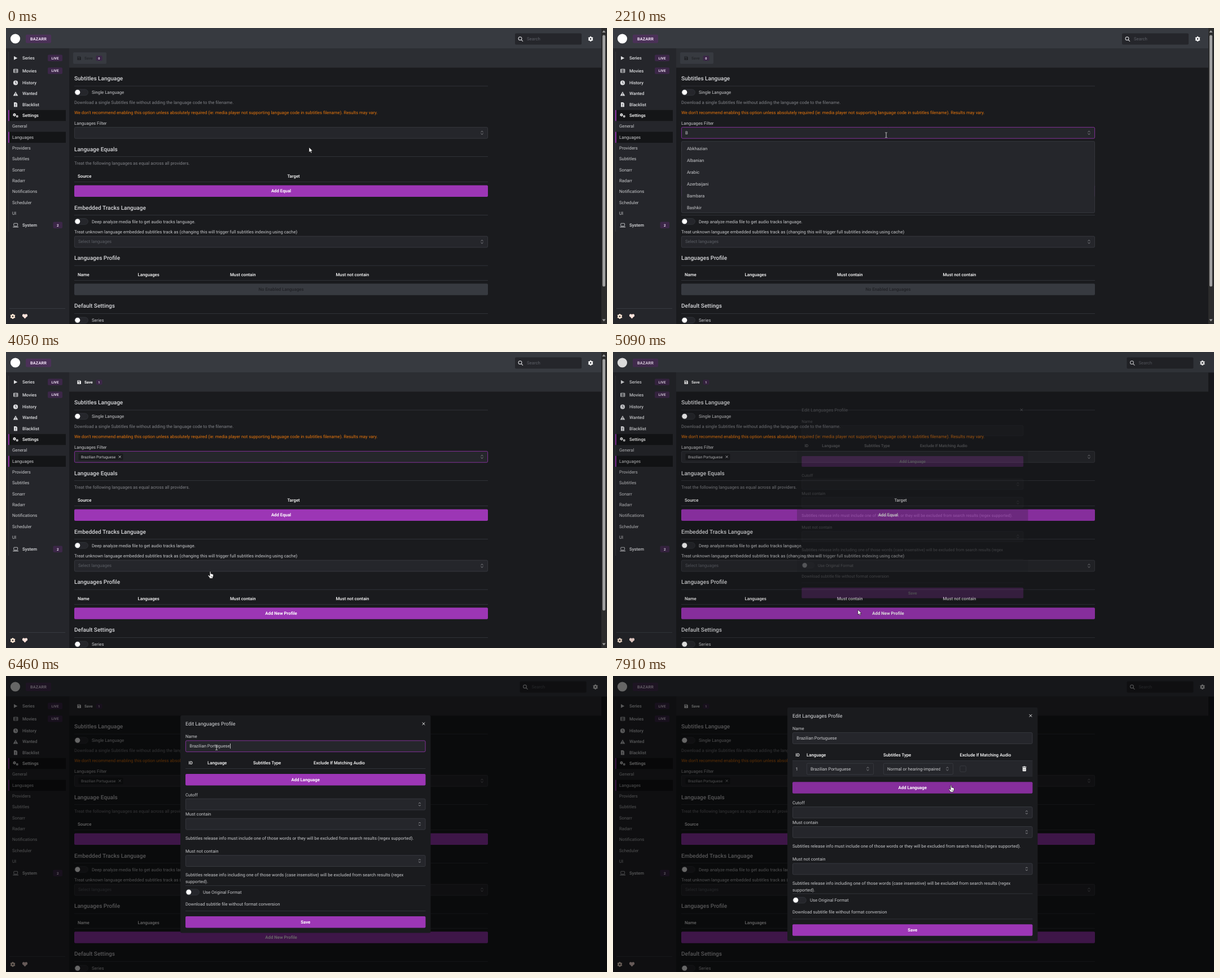
These frames come from a looping animation (1065x526 px, 7.99 s). An HTML page with a canvas:

```html
<!DOCTYPE html>
<html lang="en">
<head>
<meta charset="utf-8">
<title>Languages settings</title>
<style>
html, body { margin: 0; width: 100%; height: 100%; overflow: hidden; background: #1a1b1e; }
canvas { display: block; }
</style>
</head>
<body>
<canvas id="stage" width="1065" height="526"></canvas>
<script>
const W = 1065, H = 526, LOOP = 7990, K = 0.5567;
const stage = document.getElementById('stage').getContext('2d');
const layer = document.createElement('canvas');
layer.width = W;
layer.height = H;
const modalCtx = layer.getContext('2d');
let c = stage;

const C = {
  body: '#1a1b1e', side: '#25262b', bar: '#2c2e33', head: '#373a40', dark: '#141517',
  line: '#373a40', text: '#c9cacd', dim: '#808287', faint: '#5c5f66', white: '#fff',
  accent: '#9c36b5', hover: '#862e9c', badge: '#3c2748', warn: '#e8760c'
};

// Bursts of change: start, end, number of steps
const BURSTS = [[920, 1610, 11], [2080, 2210, 2], [2540, 2610, 2], [2810, 3570, 11],
  [3630, 3630, 1], [3770, 4540, 12], [4610, 4610, 1], [4760, 5510, 12], [5580, 6200, 10],
  [6460, 6460, 1], [6860, 7630, 12], [7700, 7910, 4]];

// Pointer path: time, x, y, easing towards this point
const PATH = [[0, 537, 212, 'lin'], [920, 537, 212, 'lin'], [1370, 484, 190, 'both'],
  [2810, 484, 190, 'lin'], [3190, 271, 205, 'both'], [3420, 265, 210, 'out'],
  [3770, 265, 210, 'lin'], [4050, 362, 390, 'in'], [4540, 434, 457, 'out'],
  [4610, 434, 458, 'lin'], [5100, 434, 458, 'lin'], [5510, 387, 187, 'both'],
  [5720, 373, 127, 'out'], [6860, 373, 127, 'lin'], [7350, 600, 184, 'both'],
  [7700, 600, 185, 'lin'], [7910, 599, 194, 'out']];
const PRESSES = [[1400, 1600], [3490, 3620], [4760, 4900], [5780, 5930], [7480, 7690]];
const EASE = {
  lin: p => p,
  in: p => p ** 1.6,
  out: p => 1 - (1 - p) ** 2,
  both: p => p * p * (3 - 2 * p)
};

function snap(t) {
  let at = 0;
  for (const [a, b, n] of BURSTS) {
    if (t < a) break;
    if (n === 1) { at = a; continue; }
    const step = (b - a) / (n - 1);
    at = a + Math.min(n - 1, Math.floor((t - a + 25) / step)) * step;
  }
  return at;
}

function pointer(t) {
  const i = PATH.findIndex(k => k[0] > t);
  if (i < 0) return PATH[PATH.length - 1].slice(1, 3);
  const a = PATH[i - 1], b = PATH[i];
  const p = EASE[b[3]]((t - a[0]) / (b[0] - a[0]));
  return [a[1] + (b[1] - a[1]) * p, a[2] + (b[2] - a[2]) * p];
}

const within = (t, [a, b]) => t >= a && t < b;

function rect(x, y, w, h, fill, r = 0, stroke) {
  c.beginPath();
  c.roundRect(x, y, w, h, r);
  if (fill) { c.fillStyle = fill; c.fill(); }
  if (stroke) { c.strokeStyle = stroke; c.lineWidth = 0.8; c.stroke(); }
}

function dot(x, y, r, fill) {
  c.beginPath();
  c.arc(x, y, r, 0, 7);
  c.fillStyle = fill;
  c.fill();
}

function poly(pts, fill, stroke, width = 0.8, close = true) {
  c.beginPath();
  pts.forEach(([x, y]) => c.lineTo(x, y));
  if (close) c.closePath();
  if (fill) { c.fillStyle = fill; c.fill(); }
  if (stroke) { c.strokeStyle = stroke; c.lineWidth = width; c.lineJoin = 'round'; c.stroke(); }
}

// y is the middle of the capitals, size is in unscaled px
function text(s, x, y, fill = C.text, size = 14, weight = 400, align = 'left') {
  c.font = `${weight} ${size * K}px Roboto, sans-serif`;
  c.textRendering = 'geometricPrecision';
  c.textAlign = align;
  c.fillStyle = fill;
  c.fillText(s, x, y + size * K * 0.36);
}

const rule = (x, y, w) => rect(x, y - 0.4, w, 0.8, C.line);
const label = (s, x, y, fill = C.white) => text(s, x, y, fill, 14, 500);

function badge(s, x, y, w, h, size = 11, fill = C.badge) {
  rect(x, y - h / 2, w, h, fill, 2);
  c.letterSpacing = '0.14px';
  text(s, x + w / 2, y, '#f3e4f8', size, 700, 'center');
  c.letterSpacing = '0px';
}

function chevrons(x, y) {
  poly([[x - 2, y - 1.2], [x, y - 3], [x + 2, y - 1.2]], null, '#a6a7ab', 0.8, false);
  poly([[x - 2, y + 1.2], [x, y + 3], [x + 2, y + 1.2]], null, '#a6a7ab', 0.8, false);
}

function cross(x, y, r, color) {
  poly([[x - r, y - r], [x + r, y + r]], null, color, 0.9, false);
  poly([[x - r, y + r], [x + r, y - r]], null, color, 0.9, false);
}

function field(x, y, w, select = true, focus = false) {
  rect(x + 0.4, y + 0.4, w - 0.8, 19.8, C.side, 2, focus ? C.accent : '#3b3e44');
  if (select) chevrons(x + w - 10.5, y + 10.2);
}

function button(s, x, y, w, hot) {
  rect(x, y, w, 20.5, hot ? C.hover : C.accent, 2);
  text(s, x + w / 2, y + 10.2, C.white, 14, 600, 'center');
}

function toggle(s, x, y) {
  rect(x + 0.4, y - 5.2, 24, 10.6, C.side, 5.3, '#33363b');
  dot(x + 5.8, y, 4.5, C.white);
  text(s, x + 31, y);
}

function gear(x, y, r, color) {
  c.strokeStyle = color;
  c.lineWidth = r * 0.55;
  c.beginPath();
  c.arc(x, y, r * 0.6, 0, 7);
  c.stroke();
  c.lineWidth = r * 0.4;
  for (let i = 0; i < 6; i++) {
    const a = i * Math.PI / 3 + 0.52;
    c.beginPath();
    c.moveTo(x + Math.cos(a) * r * 0.7, y + Math.sin(a) * r * 0.7);
    c.lineTo(x + Math.cos(a) * r * 1.1, y + Math.sin(a) * r * 1.1);
    c.stroke();
  }
}

function heart(x, y, color) {
  dot(x - 2.1, y - 1.2, 2.5, color);
  dot(x + 2.1, y - 1.2, 2.5, color);
  poly([[x - 4.4, y - 0.2], [x + 4.4, y - 0.2], [x, y + 4.5]], color);
}

function floppy(x, y, fill, hole) {
  poly([[x - 3, y - 3.2], [x + 1.8, y - 3.2], [x + 3.3, y - 1.6], [x + 3.3, y + 3.3], [x - 3, y + 3.3]], fill);
  rect(x - 1.8, y - 2.2, 3.2, 1.5, hole);
  dot(x + 0.1, y + 1.4, 1, hole);
}

function header(locked) {
  rect(0, 0, W, 36.5, C.head);
  dot(16.5, 19, 8.6, C.white);
  badge('BAZARR', 35, 19.3, 45, 15, 13, '#4b3158');
  const s = locked ? 8.5 : 0;
  rect(902 + s, 9.5, 118, 20, C.side, 2);
  c.strokeStyle = C.text;
  c.lineWidth = 1.2;
  c.beginPath();
  c.arc(911 + s, 18.8, 2.9, 0, 7);
  c.moveTo(913.2 + s, 21);
  c.lineTo(916 + s, 23.8);
  c.stroke();
  text('Search', 923 + s, 19.5, C.faint);
  gear(1036 + s, 19.4, 4.2, C.white);
}

function sidebar() {
  rect(0, 36.5, 112, H, C.side);
  rect(4.3, 42, 0.8, 320, '#3b3e44');
  for (const y of [145.8, 184.6]) {
    rect(4, y, 102, 19.4, C.dark);
    rect(4, y, 1.8, 19.4, C.accent);
  }
  const items = [['Series', 53.3], ['Movies', 76], ['History', 97.2], ['Wanted', 116.6],
    ['Blacklist', 135.8], ['Settings', 155.2], ['System', 350.3]];
  items.forEach(([s, y]) => label(s, 29, y, s === 'Settings' ? C.white : '#dcdde0'));
  'General,Languages,Providers,Subtitles,Sonarr,Radarr,Notifications,Scheduler,UI'.split(',')
    .forEach((s, i) => text(s, 11, 174.4 + i * 19.36));
  badge('LIVE', 74, 53.3, 26, 11.5);
  badge('LIVE', 74, 76, 26, 11.5);
  badge('2', 83.5, 350.3, 16.5, 11.5);

  const w = '#dcdde0';
  poly([[14, 50], [20.3, 53.4], [14, 56.8]], w);
  rect(13, 72.8, 8.4, 6.8, w, 1);
  rect(15.2, 73.8, 4, 1.9, C.side);
  rect(15.2, 76.7, 4, 1.9, C.side);
  for (const x of [13.7, 19.9]) for (const y of [73.8, 75.7, 77.6]) rect(x, y, 0.9, 1, C.side);
  dot(17, 97.4, 4.1, w);
  poly([[17, 94.8], [17, 97.5], [18.7, 98.8]], null, C.side, 0.9, false);
  poly([[17, 113], [21.3, 120.6], [12.7, 120.6]], w);
  rect(16.6, 115.5, 0.9, 2.6, C.side);
  rect(16.6, 118.8, 0.9, 0.9, C.side);
  poly([[14, 132], [18, 132], [20, 134], [20, 140.2], [14, 140.2]], w);
  rect(16.6, 134.5, 0.9, 2.8, C.side);
  rect(16.6, 138, 0.9, 0.9, C.side);
  gear(15, 154.3, 2.6, C.white);
  gear(19.7, 157, 2, C.white);
  rect(13.8, 347.2, 6.8, 4.8, null, 0.6, w);
  rect(12.3, 353.2, 9.8, 1, w);

  rule(6, 498.5, 99);
  gear(12, 512.5, 4.2, '#ffe8d6');
  heart(33.5, 512, '#ffe3dc');
}

function scrollbar() {
  rect(1055, 0, 10, H, '#2c2c2c');
  rect(1057, 12.5, 5, 447, '#9f9f9f', 2.5);
  poly([[1056.5, 8], [1059.5, 4], [1062.5, 8]], '#9f9f9f');
  poly([[1056.5, 517.5], [1059.5, 521.5], [1062.5, 517.5]], '#9f9f9f');
}

function section(s, y, lineY) {
  text(s, 121, y, '#d8d9dc', 18, 500);
  rule(121, lineY, 733);
}

function options(t) {
  const list = t >= 2600 ? ['Brazilian Portuguese']
    : t >= 2540 ? ['Brazilian Portuguese', 'Breton', 'Hebrew']
    : t >= 2210 ? ['Abkhazian', 'Albanian', 'Arabic', 'Azerbaijani', 'Bambara', 'Bashkir']
    : ['Abkhazian', 'Afar', 'Afrikaans', 'Akan', 'Albanian', 'Amharic'];
  rect(121.4, 201.4, 732.2, Math.min(127, 7 + 21 * list.length), C.side, 2, '#3b3e44');
  const [x, y] = pointer(t);
  if (y > 206 && x < 480) rect(124, 205, 727, 20, C.bar, 2);
  list.forEach((s, i) => text(s, 131, 214.3 + i * 21));
}

function page(t, s) {
  rect(0, 0, W, H, C.body);
  rect(112, 36.5, 943, 34, C.bar);
  header(s.locked);
  sidebar();
  if (!s.locked) scrollbar();

  if (!s.picked) rect(119, 43.3, 59, 20.5, C.head, 2);
  floppy(129.5, 53.6, s.picked ? C.white : '#1f2024', s.picked ? C.bar : C.head);
  text('Save', 139, 53.8, s.picked ? C.white : '#25272b', 12, 600);
  badge(s.picked ? '1' : '0', 159.5, 53.7, 11, 9, 10);

  section('Subtitles Language', 89.6, 103.2);
  toggle('Single Language', 121, 114.3);
  text('Download a single Subtitles file without adding the language code to the filename.', 121, 131.8, C.dim);
  text("We don't recommend enabling this option unless absolutely required (ie: media player not supporting language code in subtitles filename). Results may vary.", 121, 150.2, C.warn);
  text('Languages Filter', 121, 168.8);
  field(121, 176, 733, true, s.focus);
  if (s.picked) {
    rect(128.5, 180.5, 79, 11.8, C.body, 1.5);
    text('Brazilian Portuguese', 133, 186.3, C.text, 12);
    cross(201.7, 186.3, 2, C.text);
  } else {
    text(t >= 2600 ? 'Bra' : t >= 2540 ? 'Br' : t >= 2080 ? 'B' : '', 128, 186);
  }

  section('Language Equals', 215.4, 228.7);
  text('Treat the following languages as equal across all providers.', 121, 240.5, C.dim);
  label('Source', 127, 263);
  label('Target', 498.5, 263);
  rule(121, 273.6, 733);
  button('Add Equal', 121, 279.4, 733, s.hot === 'equal');

  section('Embedded Tracks Language', 319, 332.4);
  toggle('Deep analyze media file to get audio tracks language.', 121, 343.7);
  text('Treat unknown language embedded subtitles track as (changing this will trigger full subtitles indexing using cache)', 121, 362.5);
  field(121, 369.7, 733);
  text('Select languages', 128, 379.6, C.faint);

  section('Languages Profile', 408.8, 422.2);
  [['Name', 127], ['Languages', 233.5], ['Must contain', 397], ['Must not contain', 584.5]]
    .forEach(([h, x]) => label(h, x, 438.2));
  rule(121, 448.6, 733);
  if (s.picked) {
    button('Add New Profile', 121, 454.3, 733, s.hot === 'profile');
  } else {
    rect(121, 454.3, 733, 20.5, C.head, 2);
    text('No Enabled Languages', 487.5, 464.6, '#202125', 14, 500, 'center');
  }

  section('Default Settings', 493.8, 507.3);
  toggle('Series', 121, 519.2);
  if (s.open) options(t);
}

function modal(s) {
  const e = s.added ? 28.6 : 0, top = 70 - e / 2, x = 318, w = 425.5;
  rect(309, top, 443.5, 386.5 + e, C.body, 2.5);
  text('Edit Languages Profile', x, top + 14.8, '#d8d9dc', 16);
  cross(740, top + 14.8, 2.3, C.white);
  text('Name', x, top + 37.2);
  field(x, top + 44.5, w, false, s.nameFocus);
  if (s.named) text('Brazilian Portuguese', 325.3, top + 54.6);
  if (s.nameFocus) rect(s.named ? 397 : 325.3, top + 50, 0.7, 9, C.white);

  const cols = s.added ? [323.5, 343, 479, 614.5] : [323.5, 357, 438, 545];
  ['ID', 'Language', 'Subtitles Type', 'Exclude If Matching Audio']
    .forEach((h, i) => label(h, cols[i], top + 84.2));
  rule(x, top + 94.6, w);
  if (s.added) {
    const y = top + 109.3;
    rect(x, y - 14, w, 28, C.side);
    text('1', 323.5, y);
    field(343, y - 10.2, 119);
    text('Brazilian Portuguese', 350, y);
    field(479, y - 10.2, 124);
    c.save();
    c.beginPath();
    c.rect(486, y - 8, 94, 16);
    c.clip();
    text('Normal or hearing-impaired', 486, y);
    c.restore();
    rect(614.9, y - 5.3, 10.6, 10.6, C.side, 2, '#3b3e44');
    rect(725.2, y - 3.8, 7.4, 1.1, C.white);
    rect(727.4, y - 4.6, 3, 1, C.white);
    rect(725.8, y - 2, 6.2, 6.3, C.white, 0.8);
    for (const dx of [-1.8, 0, 1.8]) rect(728.6 + dx, y - 0.8, 0.6, 3.8, '#777');
  }

  const y = top + e;
  button('Add Language', x, y + 104, w, s.hot === 'add');
  text('Cutoff', x, y + 141);
  field(x, y + 147.8, w);
  text('Must contain', x, y + 175.6);
  field(x, y + 182.8, w);
  text('Subtitles release info must include one of those words or they will be excluded from search results (regex supported).', x, y + 218.3);
  text('Must not contain', x, y + 241);
  field(x, y + 248.3, w);
  text('Subtitles release info including one of those words (case insensitive) will be excluded from search results (regex', x, y + 283.6);
  text('supported).', x, y + 295.6);
  rule(x, y + 302.6, w);
  toggle('Use Original Format', x, y + 314);
  text('Download subtitle file without format conversion', x, y + 335.2);
  rule(x, y + 347.6, w);
  button('Save', x, y + 357, w, s.hot === 'save');
}

// What lies under the pointer: [kind, name]
function under(x, y, s) {
  const on = (a, b) => y >= a && y < b;
  if (s.shown > 0.5) {
    const e = s.added ? 14.3 : 0;
    if (on(114, 135)) return ['beam'];
    if (on(174 + e, 195 + e)) return ['hand', 'add'];
    if (on(427 + e, 448 + e)) return ['hand', 'save'];
    return [[218, 253, 318].some(a => on(a + e, a + 20 + e)) ? 'hand' : 'arrow'];
  }
  if (s.locked) return ['arrow'];
  if (on(176, 197)) return ['beam'];
  if (s.open) return [on(206, 226) ? 'hand' : 'arrow'];
  if (on(279, 300)) return ['hand', 'equal'];
  if (on(369, 391)) return ['hand'];
  if (on(454, 475)) return ['hand', 'profile'];
  return ['arrow'];
}

function cursor(kind, x, y, pressed) {
  if (pressed) dot(x, y, 7, 'rgba(240,228,20,.65)');
  c.save();
  c.translate(x, y);
  if (kind === 'beam') {
    const col = pressed ? '#2b2a10' : '#d8d8d8';
    rect(-0.4, -4.2, 0.9, 8.6, col);
    rect(-1.9, -4.6, 1.6, 0.8, col);
    rect(0.4, -4.6, 1.6, 0.8, col);
    rect(-1.9, 4, 1.6, 0.8, col);
    rect(0.4, 4, 1.6, 0.8, col);
  } else if (kind === 'hand') {
    poly([[-0.9, 0.4], [0, -0.2], [0.9, 0.4], [1, 4], [2.6, 4.2], [4.2, 4.8], [5.4, 5.6],
      [5.4, 8.6], [4.2, 11], [4.2, 12.2], [-1.2, 12.2], [-1.4, 10.8], [-4, 7.4], [-3.4, 6.4],
      [-2.4, 6.8], [-0.9, 8.2]], '#fff', '#111', 0.7);
    for (const dx of [1, 2.4, 3.8]) rect(dx, 8, 0.5, 2.4, '#555');
  } else {
    poly([[0, 0], [0, 9], [2.1, 7.1], [3.6, 10.3], [5, 9.7], [3.6, 6.6], [6.3, 6.5]], '#fff', '#111', 0.6);
  }
  c.restore();
}

function draw(now) {
  const t = snap(now), [x, y] = pointer(t);
  const k = Math.max(0, Math.min(1, (t - 5084) / 200));
  const s = {
    focus: within(t, [1535, 4800]),
    open: within(t, [1535, 3490]),
    picked: t >= 3490,
    locked: t >= 5020,
    shown: 1 - (1 - k) ** 3,
    nameFocus: within(t, [5850, 7480]),
    named: t >= 6460,
    added: t >= 7700
  };
  const [kind, hot] = under(x, y, s);
  s.hot = hot;

  c = stage;
  page(t, s);
  if (s.shown > 0) {
    rect(0, 0, W, H, `rgba(0,0,0,${0.6 * s.shown})`);
    c = modalCtx;
    const z = 0.9 + 0.1 * s.shown;
    c.clearRect(0, 0, W, H);
    c.save();
    c.translate(531, 263 + 5.57 * (1 - s.shown));
    c.scale(z, z);
    c.translate(-531, -263);
    modal(s);
    c.restore();
    c = stage;
    c.globalAlpha = s.shown;
    c.drawImage(layer, 0, 0);
    c.globalAlpha = 1;
  }
  cursor(kind, x, y, PRESSES.some(p => within(t, p)));
}

const start = performance.now();
function frame() {
  draw((performance.now() - start) % LOOP);
  requestAnimationFrame(frame);
}
frame();
</script>
</body>
</html>
```
